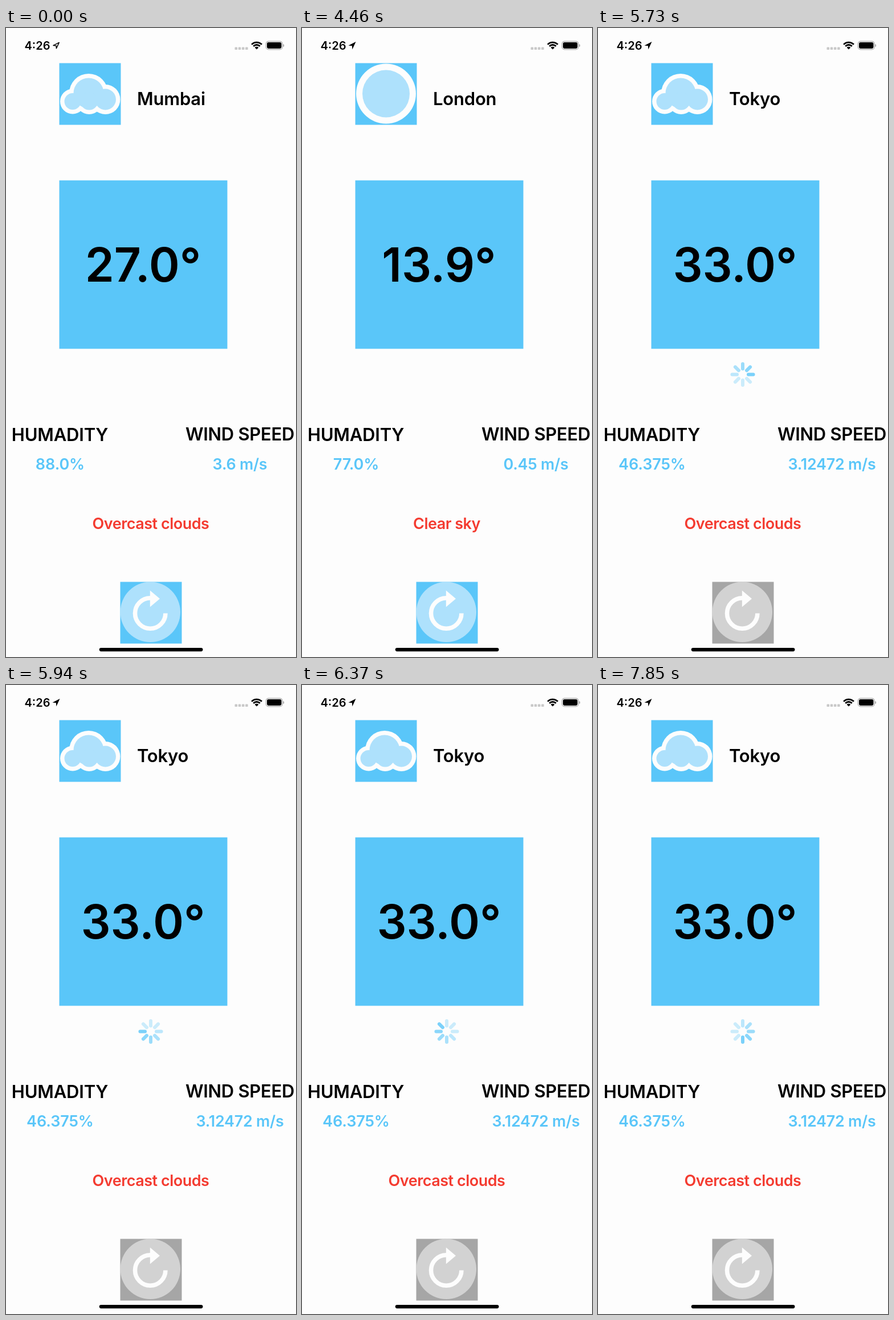
Write an HTML page with a canvas that moves like this. It is 509x1101 px and loops after 8 s.

```html
<!DOCTYPE html>
<html lang="en">
<head>
<meta charset="utf-8">
<title>Weather</title>
<style>
html, body { margin: 0; width: 100%; height: 100%; overflow: hidden; background: #fdfdfd; }
canvas { display: block; width: 509px; height: 1101px; }
</style>
</head>
<body>
<canvas id="stage" width="509" height="1101"></canvas>
<script>
const ctx = document.getElementById('stage').getContext('2d');
const LOOP = 8000;
const TAU = Math.PI * 2;
const BLUE = '#5ac6f9', PALE = '#aee1fc', WHITE = '#fdfdfd', RED = '#f43b30';

const cities = [
  { from: 0, name: 'Mumbai', temp: '27.0°', humidity: '88.0%', wind: '3.6 m/s', sky: 'Overcast clouds', icon: cloud },
  { from: 4460, name: 'London', temp: '13.9°', humidity: '77.0%', wind: '0.45 m/s', sky: 'Clear sky', icon: sun },
  { from: 5520, name: 'Tokyo', temp: '33.0°', humidity: '46.375%', wind: '3.12472 m/s', sky: 'Overcast clouds', icon: cloud }
];
const LOADING_FROM = 5730;

function rect(x, y, w, h, color) {
  ctx.fillStyle = color;
  ctx.fillRect(x, y, w, h);
}

function pill(x, y, w, h, r, color) {
  ctx.fillStyle = color;
  ctx.beginPath();
  ctx.roundRect(x, y, w, h, r);
  ctx.fill();
}

function disc(x, y, r, color) {
  ctx.fillStyle = color;
  ctx.beginPath();
  ctx.arc(x, y, r, 0, TAU);
  ctx.fill();
}

function polygon(points, color) {
  ctx.beginPath();
  points.forEach(([x, y]) => ctx.lineTo(x, y));
  ctx.closePath();
  ctx.fillStyle = color;
  ctx.fill();
}

function text(str, x, y, size, color, align = 'center', spacing = 0) {
  ctx.font = `600 ${size}px Inter, sans-serif`;
  ctx.letterSpacing = spacing + 'px';
  ctx.textAlign = align;
  ctx.fillStyle = color;
  ctx.fillText(str, x, y);
}

function cloud() {
  const lobes = [[117, 128.5, 22], [145, 114, 34], [146, 128, 23], [174.5, 125, 26]];
  for (const [inset, color] of [[0, WHITE], [7.5, PALE]]) {
    lobes.forEach(([x, y, r]) => disc(x, y, r - inset, color));
  }
}

function sun() {
  disc(147.5, 115, 52.5, WHITE);
  disc(147.5, 115, 41.5, PALE);
}

function locationArrow(t) {
  const filled = t >= 4460;
  const color = filled || t < 210 ? '#000' : t < 420 ? '#2c2c2c' : '#666';
  const points = filled
    ? [[94.5, 24], [81.5, 30.8], [87.8, 31.2], [88.3, 37.5]]
    : [[93.2, 25.4], [83, 30.6], [88, 30.9], [88.4, 35.8]];
  polygon(points, filled ? color : 'transparent');
  if (!filled) {
    ctx.strokeStyle = color;
    ctx.lineWidth = 1.5;
    ctx.lineJoin = 'round';
    ctx.stroke();
  }
}

function wifi() {
  const x = 440, y = 37.5, spread = 0.8;
  ctx.strokeStyle = '#000';
  ctx.lineWidth = 2.8;
  ctx.lineCap = 'butt';
  for (const r of [8, 12.4]) {
    ctx.beginPath();
    ctx.arc(x, y, r, -Math.PI / 2 - spread, -Math.PI / 2 + spread);
    ctx.stroke();
  }
  ctx.beginPath();
  ctx.moveTo(x, y);
  ctx.arc(x, y, 4.7, -Math.PI / 2 - spread, -Math.PI / 2 + spread);
  ctx.fillStyle = '#000';
  ctx.fill();
}

function statusBar(t) {
  text('4:26', 32.5, 38, 20, '#000', 'left');
  locationArrow(t);
  for (let i = 0; i < 4; i++) pill(401.5 + i * 6.2, 33.5, 4.6, 4.6, 1.2, '#c9c9c9');
  wifi();
  ctx.strokeStyle = '#a3a3a3';
  ctx.lineWidth = 1.1;
  ctx.beginPath();
  ctx.roundRect(456.3, 23.4, 28.9, 14.2, 4.4);
  ctx.stroke();
  pill(458, 25.1, 25.5, 10.8, 2.8, '#000');
  pill(486.4, 28.2, 1.7, 4.8, [0, 1.7, 1.7, 0], '#a3a3a3');
}

function refreshButton(disabled) {
  rect(200.5, 969.5, 108, 108, disabled ? '#a6a6a6' : BLUE);
  disc(253.3, 1022.3, 52.7, disabled ? '#d2d2d2' : PALE);
  ctx.strokeStyle = WHITE;
  ctx.lineWidth = 7.6;
  ctx.lineCap = 'butt';
  ctx.beginPath();
  ctx.arc(253.2, 1024.5, 26.7, 0, TAU * 0.75);
  ctx.stroke();
  polygon([[252.8, 984.5], [270, 999], [252.8, 1013.5]], WHITE);
}

// The spinner turns once per 400 ms but is only redrawn about every 212 ms.
function spinner(t) {
  const tick = Math.floor((t - LOADING_FROM) / 212 + 0.02);
  const shown = LOADING_FROM + tick * 212;
  const head = 6 + Math.floor((shown - 5940) / 50 + 0.55);
  for (let back = 0; back < 8; back++) {
    ctx.save();
    ctx.translate(254, 606.5);
    ctx.rotate((head - back) * TAU / 8);
    ctx.globalAlpha = Math.max(0.3, 0.8 - back * 0.1);
    pill(-3, -21.5, 6, 14.5, 3, BLUE);
    ctx.restore();
  }
}

function draw(t) {
  const city = cities.findLast(c => t >= c.from);
  const loading = t >= LOADING_FROM;

  rect(0, 0, 509, 1101, '#fdfdfd');
  statusBar(t);

  rect(93.5, 61.5, 108, 108, BLUE);
  city.icon();
  text(city.name, 230, 135, 31, '#000', 'left', -0.2);

  rect(93.5, 266.7, 295, 294.8, BLUE);
  text(city.temp, 240.5, 444, 82, '#000');
  if (loading) spinner(t);

  text('HUMADITY', 94.5, 723, 31, '#000', 'center', -0.2);
  text('WIND SPEED', 410.5, 722, 31, '#000', 'center', -0.3);
  text(city.humidity, 95, 773, 27, BLUE, 'center', -0.1);
  text(city.wind, 410.5, 773, 27, BLUE, 'center', -0.3);
  text(city.sky, 254, 877, 27, RED, 'center', -0.5);

  refreshButton(loading);
  pill(163.7, 1085, 181.8, 6.2, 3.1, '#000');
}

const start = performance.now();
function frame(now) {
  draw(Math.max(0, now - start) % LOOP);
  requestAnimationFrame(frame);
}
draw(0);
requestAnimationFrame(frame);
</script>
</body>
</html>
```
